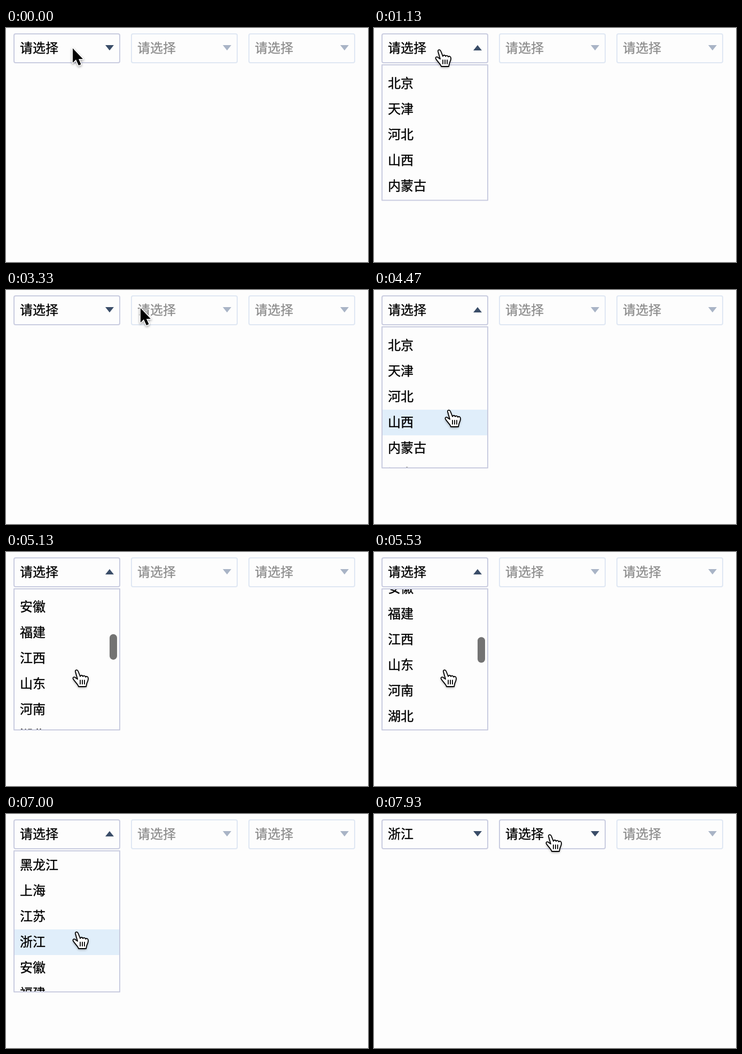
Animation, 678 px wide and 438 px high, one loop 8 s. Source, as an HTML page with a canvas:

```html
<!DOCTYPE html>
<html lang="zh-CN">
<head>
<meta charset="utf-8">
<title>省份选择</title>
<style>
  html, body { margin: 0; width: 100%; height: 100%; overflow: hidden; background: #fdfdfd; }
  canvas { display: block; }
</style>
</head>
<body>
<canvas id="stage" width="678" height="438"></canvas>
<script>
const ctx = document.getElementById('stage').getContext('2d');
const LOOP = 8000;
const ROW = 48, LIST_TOP = 68, LIST_HEIGHT = 266, FIRST_ROW = 80;
const SLIDE = 200, PICK_TIME = 7050;
const OPENINGS = [[955, 2300], [3780, PICK_TIME]];
const PROVINCES = ('北京 天津 河北 山西 内蒙古 辽宁 吉林 黑龙江 上海 江苏 浙江 安徽 福建 江西 山东 河南 ' +
  '湖北 湖南 广东 广西 海南 重庆 四川 贵州 云南 西藏 陕西 甘肃 青海 宁夏 新疆').split(' ');
const COLORS = {
  page: '#fdfdfd', border: '#c9cce0', borderOff: '#dfe7f3', text: '#000', textOff: '#8e8e8e',
  arrow: '#3a4d68', arrowOff: '#a9b4c6', hover: '#e0eefa', thumb: '#737373'
};

// Keyframes: [time, value, ...]
const POINTER = [
  [0, 125, 38], [70, 125, 38], [300, 122, 42], [2650, 122, 42], [2850, 200, 4], [3060, 315, 48],
  [3330, 252, 34], [3620, 122, 42], [3960, 122, 42], [4450, 140, 226], [4700, 140, 226],
  [5000, 132, 222], [7300, 132, 222], [7900, 329, 40]
];
const SCROLL = [[4500, 0], [5300, 598], [5450, 598], [5750, 410], [5800, 410], [6000, 344]];
const THUMB_ALPHA = [[4500, 0], [4600, 1], [6400, 1], [6650, 0]];

const HAND = new Path2D('M6 4C5 0 10 0 11 3L15 13C16 10 19 10 20 13C21 11 24 11 25 14C27 12 30 13 30 17' +
  'C30 21 28 23 27 27L26 32H12C11 28 6 24 2 18C0 14 4 13 7 16L10 18Z');
const HAND_LINES = new Path2D('M15 20V27M19 20V27M23 20V27');
const ARROW = new Path2D('M0 0V27L6 21L11 32L15.500 30L11 20H19Z');

const clamp = x => Math.min(1, Math.max(0, x));
const ease = x => x * x * (3 - 2 * x);

function sample(keys, t) {
  const next = keys.findIndex(k => k[0] > t);
  if (next === 0) return keys[0].slice(1);
  if (next < 0) return keys[keys.length - 1].slice(1);
  const a = keys[next - 1], b = keys[next];
  const p = ease((t - a[0]) / (b[0] - a[0]));
  return a.slice(1).map((v, i) => v + (b[i + 1] - v) * p);
}

const scrollAt = t => Math.round(sample(SCROLL, t)[0]);

function slideAmount(t) {
  return Math.max(...OPENINGS.map(([open, close]) =>
    ease(clamp((t - open) / SLIDE)) * (1 - ease(clamp((t - close) / SLIDE)))));
}

const isOpen = t => OPENINGS.some(([open, close]) => t >= open && t < close);

function rowUnderPointer(t) {
  const y = sample(POINTER, t)[1];
  return y > LIST_TOP ? Math.floor((y - FIRST_ROW + scrollAt(t)) / ROW) : -1;
}

// The highlight only follows the pointer while the list rests.
function hoveredRow(t) {
  return rowUnderPointer(t < 4500 ? t : t < 5770 ? 4500 : t < 6080 ? 5770 : 6080);
}

// A hairline outline gives the slightly heavier strokes of the interface font.
function drawText(text, x, y, color) {
  ctx.fillStyle = ctx.strokeStyle = color;
  ctx.lineWidth = 0.4;
  ctx.fillText(text, x, y);
  ctx.strokeText(text, x, y);
}

function drawSelect(x, label, enabled, open) {
  ctx.strokeStyle = enabled ? COLORS.border : COLORS.borderOff;
  ctx.lineWidth = 2;
  ctx.beginPath();
  ctx.roundRect(x + 1, 11, 198, 54, 3);
  ctx.stroke();
  drawText(label, x + 12, 46, enabled ? COLORS.text : COLORS.textOff);

  const [base, tip] = open ? [42, 32] : [32, 42];
  ctx.fillStyle = enabled ? COLORS.arrow : COLORS.arrowOff;
  ctx.beginPath();
  ctx.moveTo(x + 172, base);
  ctx.lineTo(x + 188, base);
  ctx.lineTo(x + 180, tip);
  ctx.fill();
}

function drawList(t) {
  const height = LIST_HEIGHT * slideAmount(t);
  if (height < 4) return;
  const scroll = scrollAt(t), hovered = hoveredRow(t);
  ctx.save();
  ctx.beginPath();
  ctx.rect(16, LIST_TOP + 2, 196, height - 4);
  ctx.clip();
  PROVINCES.forEach((name, i) => {
    const y = FIRST_ROW + i * ROW - scroll;
    if (i === hovered) {
      ctx.fillStyle = COLORS.hover;
      ctx.fillRect(16, y, 196, ROW);
    }
    drawText(name, 26, y + 32, COLORS.text);
  });
  ctx.globalAlpha = sample(THUMB_ALPHA, t)[0];
  ctx.fillStyle = COLORS.thumb;
  ctx.beginPath();
  ctx.roundRect(194, 68.5 + scroll * 0.161, 14, 48, 7);
  ctx.fill();
  ctx.restore();

  ctx.strokeStyle = COLORS.border;
  ctx.lineWidth = 2;
  ctx.strokeRect(15, LIST_TOP + 1, 198, height - 2);
}

function drawPointer(t) {
  const [x, y] = sample(POINTER, t);
  const inHeader = y >= 10 && y < 66;
  const overFirst = inHeader && x >= 14 && x < 214;
  const overSecond = inHeader && x >= 234 && x < 434 && t >= PICK_TIME;
  const overList = isOpen(t) && y >= 66;
  const hand = t >= 70 && (overFirst || overSecond || overList);

  ctx.save();
  ctx.translate(hand ? x - 8 : x, hand ? y - 2 : y);
  ctx.lineJoin = ctx.lineCap = 'round';
  ctx.shadowColor = 'rgba(0, 0, 0, .4)';
  ctx.shadowBlur = 4;
  ctx.shadowOffsetY = 2;
  if (hand) {
    ctx.fillStyle = '#fff';
    ctx.fill(HAND);
    ctx.shadowColor = 'transparent';
    ctx.strokeStyle = '#000';
    ctx.lineWidth = 1.8;
    ctx.stroke(HAND);
    ctx.stroke(HAND_LINES);
  } else {
    ctx.strokeStyle = '#fff';
    ctx.lineWidth = 3;
    ctx.stroke(ARROW);
    ctx.shadowColor = 'transparent';
    ctx.fillStyle = '#000';
    ctx.fill(ARROW);
  }
  ctx.restore();
}

function draw(t) {
  const picked = t >= PICK_TIME;
  ctx.fillStyle = COLORS.page;
  ctx.fillRect(0, 0, 678, 438);
  ctx.font = '24px "Noto Sans CJK SC", "Noto Sans CJK", sans-serif';
  ctx.lineJoin = 'round';
  drawSelect(14, picked ? '浙江' : '请选择', true, isOpen(t));
  drawSelect(234, '请选择', picked, false);
  drawSelect(454, '请选择', false, false);
  drawList(t);
  drawPointer(t);
}

const start = performance.now();
function tick() {
  draw((performance.now() - start) % LOOP);
  requestAnimationFrame(tick);
}
tick();
</script>
</body>
</html>
```
